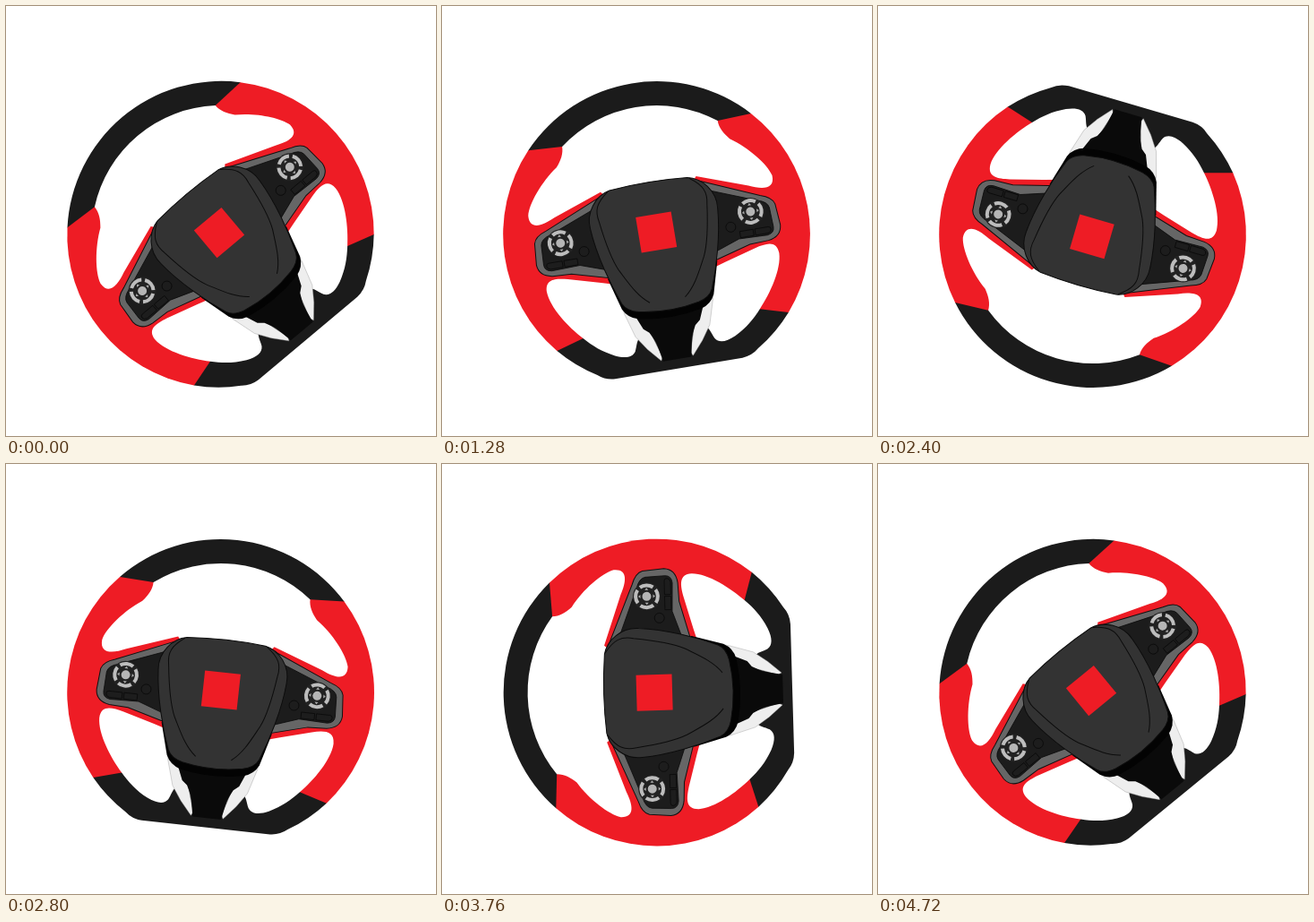
An HTML page for the animation above (4800 ms loop, 480 by 480 pixels).

```html
<!DOCTYPE html>
<html lang="en">
<head>
<meta charset="utf-8">
<title>Steering wheel</title>
<style>
  html, body { margin: 0; width: 100%; height: 100%; overflow: hidden; background: #fff; }
  svg { display: block; width: 100%; height: 100%; }
  .red { fill: #ee1c25; }
  .rim { fill: #1b1b1b; }
  .pad { fill: #333; }
  .hole { fill: #fff; }
  .line { fill: none; stroke: #0c0c0c; stroke-width: 1; }
  .button { fill: #1d1d1d; stroke: #0a0a0a; stroke-width: .8; }
</style>
</head>
<body>
<svg viewBox="0 0 480 480">
  <defs>
    <g id="grip">
      <path class="red" d="M126-116L88-114L40-60V60L100 101L131 110A170.500 170.500 0 0 0 126-116Z"/>
    </g>

    <!-- one side: lower opening, trim and control plate -->
    <g id="side">
      <path class="hole" d="M40 52L70 43L106 33C119 30 131 28 131.500 43C131 61 114 86 100 101
        C91 111 82 119 68 126C57 131 49 131 45 125C42 119 42 114 37 110L30 90Z"/>
      <path fill="#eee" stroke="#999" stroke-width=".4" d="M53 66L50 82L42 109L31 125L18 140L16 136L25 106L34 80Z"/>
      <path fill="#666" stroke="#111" d="M50-54L121-24Q134-20 136-12L138 12Q137 25 122 27L101 28L50 42Z"/>
      <path fill="#1c1c1c" stroke="#0c0c0c" stroke-width=".8" d="M50-45L117-19Q128-16 129-9L130 13Q130 20 122 21L90 20L50 34Z"/>
      <path class="button" d="M92 12H107V19H92ZM109 12H124Q127 12 127 15T123 19H109Z"/>
      <circle class="button" cx="83" cy="5.500" r="5.500"/>
      <g transform="translate(107.500 -8)">
        <circle r="15.500" fill="#222"/>
        <circle r="12.400" fill="none" stroke="#bdbdbd" stroke-width="4"
          pathLength="80" stroke-dasharray="16 4" stroke-dashoffset="8"/>
        <circle r="5" fill="#b5b5b5"/>
        <path fill="#aaa" d="M-2-7L0-9.500L2-7ZM-2 7L0 9.500L2 7ZM-7-2L-9.500 0L-7 2ZM7-2L9.500 0L7 2Z"/>
      </g>
    </g>

    <path id="seam" class="line" d="M46-56C60-46 64-38 61-24C58 0 55 18 48 33C40 48 33 64 20 74"/>
  </defs>

  <g id="wheel">
    <path class="rim" d="M-91 144L-131 110L-100 0L-126-116A172 172 0 0 1 126-116L100 0L131 110
      A171 171 0 0 1 91 144Q83 151 72 151.500H-72Q-83 151-91 144A171 171 0 0 1-131 110Z"/>
    <use href="#grip"/>
    <use href="#grip" transform="scale(-1 1)"/>
    <path class="hole" d="M-88-114A144 144 0 0 1 88-114C88-106 92-99 98-92C117-79 135-57 138-44
      C139-28 125-30 110-37L54-57L40-40H-40L-54-57L-110-37C-125-30-139-28-138-44
      C-135-57-117-79-98-92C-92-99-88-106-88-114Z"/>
    <use href="#side"/>
    <use href="#side" transform="scale(-1 1)"/>
    <path fill="#0a0a0a" d="M-42 78L-32 102L-26 107L-20 119L-16 141H16L20 119L26 107L32 102L42 78Z"/>
    <path fill="#030303" d="M-62 40L-52 76Q-47 87-35 90Q0 97 35 90Q47 87 52 76L62 40Z"/>
    <path class="pad" stroke="#0c0c0c" d="M-44-57Q0-61 44-57C60-54 74-37 72-18C70 12 60 47 51 70
      Q47 79 34 82Q0 89-34 82Q-47 79-51 70C-60 47-70 12-72-18C-74-37-60-54-44-57Z"/>
    <use href="#seam"/>
    <use href="#seam" transform="scale(-1 1)"/>
    <rect class="red" x="-20" y="-22.500" width="40" height="40"/>
  </g>
</svg>
<script>
  const wheel = document.getElementById('wheel');
  const LOOP = 4800, STEP = 80;
  // time in ms, angle in degrees
  const keys = [[0, -40], [880, 40], [1760, -40], [3280, 400], [LOOP, -40]];

  const bezier = (t, a, b) => 3 * (1 - t) ** 2 * t * a + 3 * (1 - t) * t * t * b + t ** 3;

  function ease(p) {
    let lo = 0, hi = 1;
    for (let i = 0; i < 24; i++) {
      const mid = (lo + hi) / 2;
      if (bezier(mid, .555, .29) < p) lo = mid; else hi = mid;
    }
    return bezier(lo, .235, 1);
  }

  function angleAt(time) {
    const next = keys.findIndex(([t]) => t > time);
    const [t0, a0] = keys[next - 1], [t1, a1] = keys[next];
    return a0 + (a1 - a0) * ease((time - t0) / (t1 - t0));
  }

  function draw() {
    const time = Math.floor(performance.now() % LOOP / STEP) * STEP;
    wheel.setAttribute('transform', `translate(239.6 255) rotate(${angleAt(time).toFixed(2)})`);
    requestAnimationFrame(draw);
  }
  draw();
</script>
</body>
</html>
```
